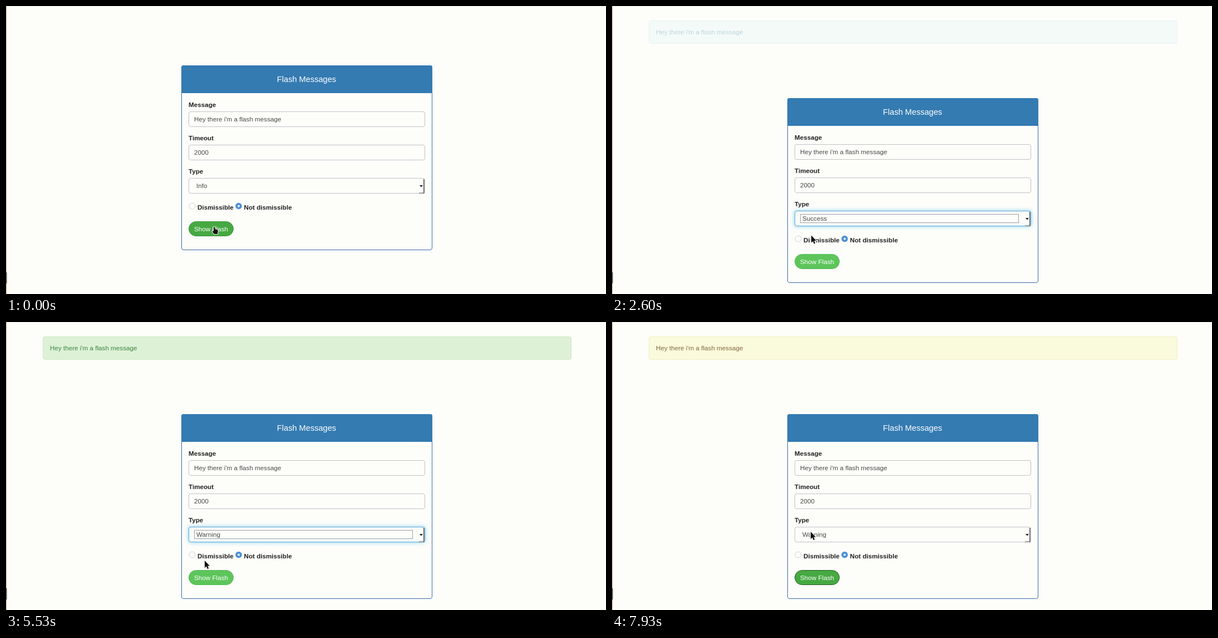
Recreate the animation shown at these times as an HTML page with a canvas. Size 1078 px wide and 519 px high, loop 8 s.

```html
<!DOCTYPE html>
<html lang="en">
<head>
<meta charset="utf-8">
<title>Flash Messages</title>
<style>
html, body { margin: 0; width: 100%; height: 100%; overflow: hidden; background: #fdfdfa; }
canvas { display: block; }
</style>
</head>
<body>
<canvas id="stage" width="1078" height="519"></canvas>
<script>
const ctx = document.getElementById('stage').getContext('2d');
const LOOP = 8000, SHIFT = 59, BG = '#fdfdfa';
const FAMILY = '"Liberation Sans", Arial, sans-serif';
const BODY = '11.667px ' + FAMILY, BOLD = 'bold ' + BODY, TITLE = '14.6px ' + FAMILY;
const MESSAGE = "Hey there i'm a flash message";
const OPTIONS = ['Info', 'Success', 'Warning', 'Danger'];

// Form rows share one pitch; the popup hangs below the moved select.
const LEFT = 328, ROW_Y = 190, PITCH = 60.33, INPUT_H = 27;
const TYPE_Y = Math.floor(ROW_Y + 2 * PITCH), BUTTON_Y = 388;
const POPUP_Y = TYPE_Y + SHIFT + INPUT_H + 1, LINE = 16.5;

// Each click shows a flash, which fades in, stays, fades out and frees its space.
const FADE = 480, HOLD = 2180;
const FLASHES = [
  { start: 70, fill: '#d7eeef', line: '#bfe6ec', ink: '#31708f' },
  { start: 3330, fill: '#dbf1d4', line: '#cfe9c6', ink: '#34803a' },
  { start: 6470, fill: '#fafadc', line: '#f0edc8', ink: '#80693a' }
];

// While a flash shows, the next type is chosen from the select.
const OPEN = 1000, PICK = 1750;
const picks = FLASHES.slice(1).map((next, i) => ({
  open: FLASHES[i].start + OPEN + 270 * (1 - i),
  pick: FLASHES[i].start + PICK + 180 * (1 - i),
  blur: next.start
}));

// Pointer stops: button, then select, then option, and back.
const GLIDE = 280;
const optionY = i => POPUP_Y + LINE * i;
const stops = [
  { at: 0, x: 374, y: 398 },
  { at: 1070, x: 366, y: 376 },
  ...picks.flatMap((p, i) => [
    { at: p.pick - 100, x: 358 - i, y: optionY(i + 1) },
    { at: p.blur - 150, x: 358, y: 400 },
    { at: p.blur + 650 * (i + 1), x: 357, y: 377 + i }
  ])
];

function pointerAt(t) {
  let { x, y } = stops[0];
  for (const s of stops) {
    const p = Math.max(0, Math.min(1, (t - s.at + GLIDE) / GLIDE));
    const e = p * p * (3 - 2 * p);
    x += (s.x - x) * e;
    y += (s.y - y) * e;
  }
  return { x, y };
}

function text(str, x, y, color, font = BODY, align = 'left') {
  ctx.font = font;
  ctx.fillStyle = color;
  ctx.textAlign = align;
  ctx.fillText(str, x, y);
}

function paint(fill, line, width = 1) {
  if (fill) { ctx.fillStyle = fill; ctx.fill(); }
  if (line) { ctx.strokeStyle = line; ctx.lineWidth = width; ctx.stroke(); }
}

function box(x, y, w, h, r, fill, line) {
  ctx.beginPath();
  ctx.roundRect(x, y, w, h, r);
  paint(fill, line);
}

function rect(x, y, w, h, color) {
  ctx.fillStyle = color;
  ctx.fillRect(x, y, w, h);
}

function disc(x, y, r, fill, line) {
  ctx.beginPath();
  ctx.arc(x, y, r, 0, Math.PI * 2);
  paint(fill, line);
}

function drawFlash(f, age) {
  ctx.globalAlpha = Math.max(0, Math.min(1, age / FADE, (HOLD + FADE - age) / FADE));
  box(66.5, 26.5, 949, 41, 3.5, f.fill, f.line);
  text(MESSAGE, 79, 51, f.ink);
  ctx.globalAlpha = 1;
}

function drawInput(label, value, row) {
  const y = Math.floor(ROW_Y + row * PITCH);
  text(label, LEFT, y - 8.5, '#222', BOLD);
  box(LEFT + 0.5, y + 0.5, 424, INPUT_H, 3.5, BG, '#c2c2ca');
  text(value, LEFT + 10, y + 18, '#484848');
}

function drawSelect(value, focused) {
  const y = TYPE_Y;
  drawInput('Type', '', 2);
  if (focused) {
    ctx.save();
    ctx.shadowColor = 'rgba(102,200,233,.75)';
    ctx.shadowBlur = 7;
    box(LEFT + 0.5, y + 0.5, 424, INPUT_H, 3.5, BG, '#66a9dc');
    ctx.restore();
    ctx.setLineDash([1, 1]);
    box(LEFT + 10.5, y + 6.5, 392, 15, 0, null, '#444');
    ctx.setLineDash([]);
  }
  text(value, LEFT + 14, y + 18, '#484848');
  rect(741, y + 2, 9, 25, BG);
  rect(750, y + 2, 1.5, 26, '#505050');
  rect(742, y + 26.5, 9, 1.2, '#707070');
  ctx.beginPath();
  ctx.moveTo(743, y + 13);
  ctx.lineTo(749, y + 13);
  ctx.lineTo(746, y + 16.2);
  paint('#111');
}

function drawForm(value, focused, pressed, hover) {
  box(315.5, 107.5, 450, 332, 3.5, BG, '#3a6aa8');
  box(315, 107, 451, 50, [3.5, 3.5, 0, 0], '#347bb2');
  text('Flash Messages', 540, 137, '#fff', TITLE, 'center');
  drawInput('Message', MESSAGE, 0);
  drawInput('Timeout', '2000', 1);
  drawSelect(value, focused);

  disc(334.5, 360.5, 5.5, BG, '#cfcfcf');
  disc(418, 360.5, 5.8, '#4a90d9');
  disc(418, 360.5, 1.9, '#fff');
  text('Dismissible', 344, 366.5, '#222', BOLD);
  text('Not dismissible', 427.5, 366.5, '#222', BOLD);

  box(LEFT + 0.5, BUTTON_Y + 0.5, 80, 26, 13, pressed || hover ? '#46a942' : '#5dc55b',
    pressed ? '#255f25' : hover ? '#3c953a' : '#50b74e');
  text('Show Flash', 368.5, BUTTON_Y + 17.5, '#fff', BODY, 'center');
}

function drawPopup(y) {
  box(LEFT + 0.5, POPUP_Y + 0.5, 424, LINE * 4 + 1, 0, '#fdfdfd', '#b8b8b8');
  const over = Math.floor((y + 0.5 - POPUP_Y) / LINE);
  OPTIONS.forEach((name, i) => {
    const top = POPUP_Y + 1 + i * LINE;
    if (i === over) rect(LEFT + 1, top, 423, LINE, '#4a90d9');
    text(name, LEFT + 14, top + 12, i === over ? '#fff' : '#484848');
  });
}

const arrow = new Path2D('M0 0V13L3 10.3L5 15L7.2 14L5.2 9.5H9Z');
const hand = new Path2D('M-1 0H1L1.5 4L6 5L7 7L6 13H0L-3 9V7L-1 8Z');

function drawPointer({ x, y }, overButton) {
  const shape = overButton ? hand : arrow;
  ctx.save();
  ctx.translate(x, y);
  ctx.lineJoin = 'round';
  ctx.lineWidth = 2;
  ctx.strokeStyle = '#f4f4f4';
  ctx.stroke(shape);
  ctx.fillStyle = '#111';
  ctx.fill(shape);
  ctx.restore();
}

function draw(t) {
  rect(0, 0, 1078, 519, BG);
  rect(0, 0, 1078, 1, '#f3f0df');
  rect(0, 0, 1, 519, '#c4a27c');
  rect(0, 480, 1.5, 20, '#4a4038');

  const flash = FLASHES.find(f => t >= f.start && t < f.start + HOLD + FADE);
  const shift = flash ? SHIFT : 0;
  if (flash) drawFlash(flash, t - flash.start);

  const focus = picks.find(p => t >= p.open && t < p.blur);
  const open = focus && t < focus.pick;
  const value = OPTIONS[picks.filter(p => t >= p.pick).length];
  const pointer = pointerAt(t), top = BUTTON_Y + shift;
  const hover = !open && pointer.y >= top && pointer.y < top + 27;

  ctx.save();
  ctx.translate(0, shift);
  drawForm(value, !!focus, !focus && t >= FLASHES[0].start, hover);
  ctx.restore();

  if (open) drawPopup(pointer.y);
  drawPointer(pointer, hover);
}

const begin = performance.now();
function tick() {
  draw((performance.now() - begin) % LOOP);
  requestAnimationFrame(tick);
}
tick();
</script>
</body>
</html>
```
